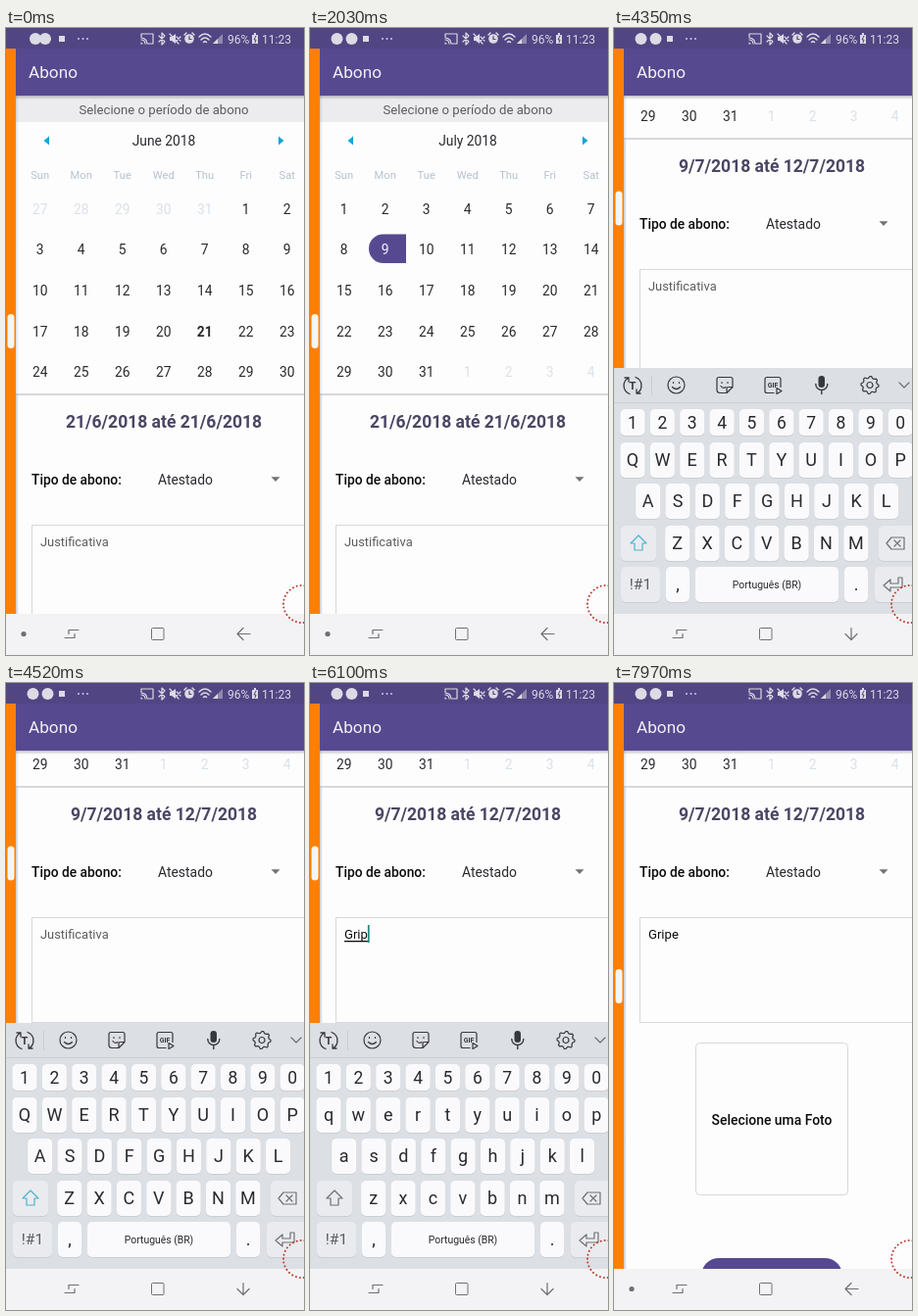
Recreate the animation shown at these times as an HTML page with a canvas. Size 304 by 640 pixels, loop 8000 ms.

```html
<!DOCTYPE html>
<html lang="pt-BR">
<head>
<meta charset="utf-8">
<title>Abono</title>
<style>
html, body { margin: 0; width: 100%; height: 100%; overflow: hidden; background: #fdfdfe; }
canvas { display: block; width: 304px; height: 640px; }
</style>
</head>
<body>
<canvas id="stage"></canvas>
<script>
const W = 304, H = 640, LOOP = 8000;
const canvas = document.getElementById('stage');
const ratio = window.devicePixelRatio || 1;
canvas.width = W * ratio;
canvas.height = H * ratio;
const ctx = canvas.getContext('2d');

const color = {
  page: '#fdfdfe', status: '#524583', header: '#574990', accent: '#574990', orange: '#fd8004',
  strip: '#ececef', nav: '#f3f3f5', board: '#dcdfe3', key: '#fafafc', softKey: '#e9ebee',
  line: '#d6d8dc', faint: '#d9e1e8', week: '#b6c1cd', ink: '#2a2a2e', grey: '#5c5c60', icon: '#707074'
};

// Moments of the interaction, in ms
const MONTH = 1080, FIRST_DAY = 1900, LAST_DAY = 2800, FOCUS = 3840;
const BOARD_IN = 3990, SCROLL = 4080, SUGGEST = 6550, BOARD_OUT = 7200;
const KEYS = [4780, 5160, 5620, 6010, 6400];
const WORD = 'Gripe', SHIFT_Y = 268, BOARD_TOP = 347, NAV_TOP = 598;

const clamp = v => Math.max(0, Math.min(1, v));
const ease = (t, start, length) => {
  const p = clamp((t - start) / length);
  return p * p * (3 - 2 * p);
};

function text(s, x, y, size, fill, align = 'center', weight = 400) {
  ctx.font = `${weight} ${size}px Roboto, sans-serif`;
  ctx.textAlign = align;
  ctx.fillStyle = fill;
  ctx.fillText(s, x, y);
}

function rect(x, y, w, h, fill) {
  ctx.fillStyle = fill;
  ctx.fillRect(x, y, w, h);
}

function round(x, y, w, h, r, fill, stroke) {
  ctx.beginPath();
  ctx.roundRect(x, y, w, h, r);
  if (fill) { ctx.fillStyle = fill; ctx.fill(); }
  if (stroke) { ctx.strokeStyle = stroke; ctx.lineWidth = 1; ctx.stroke(); }
}

function disc(x, y, r, fill) {
  ctx.beginPath();
  ctx.arc(x, y, r, 0, 7);
  ctx.fillStyle = fill;
  ctx.fill();
}

// Path given around its own centre
function icon(d, x, y, tint, filled = false, width = 1.2) {
  const path = new Path2D(d);
  ctx.save();
  ctx.translate(x, y);
  ctx.lineWidth = width;
  ctx.lineJoin = ctx.lineCap = 'round';
  ctx.strokeStyle = ctx.fillStyle = tint;
  filled ? ctx.fill(path) : ctx.stroke(path);
  ctx.restore();
}

function fade(x, y, w, h, alpha, vertical) {
  const g = vertical ? ctx.createLinearGradient(0, y, 0, y + h) : ctx.createLinearGradient(x, 0, x + w, 0);
  g.addColorStop(0, `rgba(50,50,60,${alpha})`);
  g.addColorStop(1, 'rgba(50,50,60,0)');
  rect(x, y, w, h, g);
}

function drawStatus(t) {
  const tint = '#dcdae4';
  rect(0, 0, W, 21, color.status);
  const spread = 5 + 2.5 * ease(t, 30, 300);
  disc(35 - spread, 11, 6, tint);
  disc(35 + spread, 11, 6, tint);
  rect(54, 8, 6, 6, tint);
  for (let i = 0; i < 3; i++) disc(74 + i * 4.5, 11, 0.9, tint);

  icon('M-6-2V-5H6V5H1M-6 1A4 4 0 0 1-2 5M-6-1A6 6 0 0 1 0 5M-6 4V5H-5', 144, 11, tint);
  icon('M-3-3L3 3L0 6V-6L3-3L-3 3', 159, 11, tint);
  icon('M-5-2H-3L1-5V5L-3 2H-5Z', 172, 11, tint, true);
  icon('M2-2L6 2M6-2L2 2M-5-5L4 5', 172, 11, tint);
  disc(187, 11, 4.8, tint);
  icon('M-5-4L-3-6M5-4L3-6', 187, 11, tint, false, 1.5);
  icon('M0-2.5V.5H2', 187, 11, color.status);
  icon('M-6-2Q0-8 6-2M-4 1Q0-3 4 1M-1.5 3.5Q0 2 1.5 3.5', 203, 11, tint, false, 1.5);
  icon('M-5 5H5V-5Z', 216, 11, '#9189ae', true);
  icon('M-5 5H0V0Z', 216, 11, tint, true);
  text('96%', 226, 15.5, 12, tint, 'left');
  icon('M-3-4H-1V-6H1V-4H3V5H-3Z', 254, 11, tint, true);
  icon('M1-3L-1 1H1L0 4', 254, 11, color.status, false, 1);
  text('11:23', 261, 15.5, 12, tint, 'left');
}

function drawHeader() {
  rect(0, 21, W, 48, color.header);
  text('Abono', 23, 51, 17.2, '#f1eff6', 'left');
  fade(10, 69, W - 10, 4, 0.3, true);
}

function drawCalendar(t) {
  const july = t >= MONTH;
  const colX = i => 34.7 + i * 42;
  rect(10, 69, W, 27, color.strip);
  text('Selecione o período de abono', 161, 87.5, 13.15, color.grey);
  icon('M3-4.5V4.5L-2.5 0Z', 41, 115, '#12a4e0', true);
  icon('M-3-4.5V4.5L2.5 0Z', 281, 115, '#12a4e0', true);
  text(july ? 'July 2018' : 'June 2018', 161, 120, 13.8, color.ink);
  ['Sun', 'Mon', 'Tue', 'Wed', 'Thu', 'Fri', 'Sat'].forEach((d, i) => text(d, colX(i), 153.5, 11.2, color.week));

  const from = t >= FIRST_DAY ? 9 : 99;
  const to = t >= LAST_DAY ? 12 : from;
  if (from === 9) {
    const whole = to === 12;
    round(60, 210.5, whole ? 159 : 38, 29.5, whole ? 15 : [15, 0, 0, 15], color.accent);
  }

  const lead = july ? 0 : 5, length = july ? 31 : 30;
  for (let cell = 0; cell < 35; cell++) {
    const day = cell - lead + 1;
    const outside = day < 1 || day > length;
    const label = day < 1 ? day + 31 : day > length ? day - length : day;
    const picked = !outside && day >= from && day <= to;
    const today = !july && day === 21;
    const tint = outside ? color.faint : picked ? '#f5f3f9' : color.ink;
    text(label, colX(cell % 7), 189.7 + Math.floor(cell / 7) * 41.6, 13.8, tint, 'center', today ? 700 : 400);
  }
}

function drawForm(t) {
  rect(10, 373, W, 2, color.line);
  rect(10, 375, 2, 500, '#ededf0');
  text(t >= LAST_DAY ? '9/7/2018 até 12/7/2018' : '21/6/2018 até 21/6/2018', 161, 408, 17.5, '#4b4663', 'center', 700);
  text('Tipo de abono:', 26, 465.5, 13.8, '#0c0c0c', 'left', 500);
  text('Atestado', 155, 465.5, 13.9, color.ink, 'left');
  icon('M-4.5-2.2H4.5L0 2.4Z', 275, 460.5, '#737377', true);

  ctx.strokeStyle = color.line;
  ctx.lineWidth = 1;
  ctx.strokeRect(26.5, 507.5, 320, 107);
  drawInput(t);

  round(83.5, 635.5, 155, 155, 4, null, color.line);
  text('Selecione uma Foto', 161, 719, 13.9, '#0c0c0c', 'center', 500);
  round(89, 855, 144, 36, 18, color.accent);
}

function drawInput(t) {
  const count = KEYS.filter(k => t >= k).length;
  const typed = WORD.slice(0, count);
  if (typed) text(typed, 35, 529, 13.1, '#0c0c0c', 'left');
  else text('Justificativa', 35, 529, 12.9, color.grey, 'left');
  if (t < FOCUS || t >= BOARD_OUT) return;
  ctx.font = '400 13.1px Roboto, sans-serif';
  const width = ctx.measureText(typed).width;
  if (typed) rect(35, 531, width, 1.3, '#0c0c0c');
  const since = t - (count ? KEYS[count - 1] : FOCUS);
  if (since % 1000 < 500) rect(35 + width, 515, 1.8, 18, '#238a80');
}

function drawEdge(bottom) {
  rect(0, 21, 10, bottom - 21, color.orange);
  fade(10, 69, 3, bottom - 69, 0.16, false);
  round(1.5, (21 + bottom) / 2 - 17.5, 7, 35, 3.5, '#f8f5f0');
}

function drawNav(boardOpen) {
  rect(0, NAV_TOP, W, H - NAV_TOP, color.nav);
  if (!boardOpen) disc(18, 618.5, 2.6, color.icon);
  icon('M-7 4H3V0M7-4H-3V0', 67, 618.5, color.icon);
  round(148.5, 612.5, 12.5, 12, 1, null, color.icon);
  icon(boardOpen ? 'M0-6V6M-6 0L0 6L6 0' : 'M7 0H-6M0-6L-6 0L0 6', 242, 618.5, color.icon);
}

function drawToolbar(suggesting) {
  const tint = '#38383c';
  icon('M-3 8.5A9 9 0 0 1-4-8M-8-8H-4V-4M3-8.5A9 9 0 0 1 4 8M8 8H4V4', 19, 365, tint, false, 1.3);
  icon('M-5-2.5L0 2.5L5-2.5', 296, 364.5, color.icon);
  if (suggesting) {
    icon('M-3-2V-1M3-2V-1M-3.5 2Q0 5 3.5 2', 19, 365, tint, false, 1.3);
    ['Gripe', 'Gripes', 'Tripé'].forEach((word, i) => text(word, 80 + i * 83.3, 370, 14.8, '#38383c'));
    return;
  }
  text('T', 19, 369, 11, tint, 'center', 700);
  rect(38, 355, 1, 20, '#c9ccd1');
  const ring = 'M8.5 0A8.5 8.5 0 1 1-8.5 0A8.5 8.5 0 1 1 8.5 0';
  icon(ring + 'M-3-3V-2M3-3V-2M-4 2Q0 6 4 2', 63.5, 364.5, tint);
  icon('M-6-8H6Q8-8 8-6V2L2 8H-5Q-8 8-8 5V-6Q-8-8-6-8M8 2H4Q2 2 2 4V8M-3-3V-2M3-3V-2M-4 1Q-2 4 1 2', 113, 364.5, tint);
  icon('M1 8H-6Q-8 8-8 6V-6Q-8-8-6-8H6Q8-8 8-6V2M4 3V9L9 6Z', 162, 364.5, tint);
  text('GIF', 162, 366.5, 7, tint, 'center', 700);
  round(208.5, 355, 6.5, 12, 3.2, tint);
  icon('M-6-1A6 6 0 0 0 6-1M0 5V9', 211.8, 364.5, tint, false, 1.4);
  let gear = '';
  for (let i = 0; i < 32; i++) {
    const a = i * Math.PI / 16, r = i % 4 < 2 ? 9 : 7.3;
    gear += `${i ? 'L' : 'M'}${(r * Math.cos(a)).toFixed(2)} ${(r * Math.sin(a)).toFixed(2)}`;
  }
  icon(gear + 'ZM3 0A3 3 0 1 1-3 0A3 3 0 1 1 3 0', 261, 364.5, tint);
}

function key(x, y, w, h, label, size = 18, soft = false) {
  round(x, y + 1, w, h, 5, '#cbced3');
  round(x, y, w, h, 5, soft ? color.softKey : color.key);
  if (label) text(label, x + w / 2, y + h / 2 + size * 0.35, size, soft ? color.grey : color.ink);
}

function drawBoard(t, offset) {
  const upper = t < KEYS[0];
  ctx.save();
  ctx.beginPath();
  ctx.rect(0, 0, W, NAV_TOP);
  ctx.clip();
  ctx.translate(0, offset);
  rect(0, BOARD_TOP, W, NAV_TOP - BOARD_TOP, color.board);
  rect(0, BOARD_TOP + 35, W, 1, '#cbced3');
  drawToolbar(t >= SUGGEST);

  const rows = [['1234567890', 19, 389, 27], ['qwertyuiop', 19, 423, 36], ['asdfghjkl', 34.7, 465, 36], ['zxcvbnm', 64.7, 508, 36]];
  for (const [letters, first, y, h] of rows) {
    [...letters].forEach((c, i) => key(first - 12.5 + i * 30.36, y, 25, h, upper ? c.toUpperCase() : c, h < 30 ? 17.5 : 18));
  }
  key(7, 508, 36, 36, '', 18, true);
  icon('M0-8L8 0H4V7H-4V0H-8Z', 25, 526, upper ? '#4fb4cf' : color.icon);
  key(270, 508, 42, 36, '', 18, true);
  icon('M-9 0L-4-6H9V6H-4ZM-1-3L5 3M5-3L-1 3', 287, 526, color.icon);
  key(7, 550, 40, 36, '!#1', 15.5, true);
  key(53, 550, 24, 36, ',');
  key(83, 550, 146, 36, 'Português (BR)', 10.4);
  key(235, 550, 24, 36, '.');
  key(266, 550, 46, 36, '', 18, true);
  icon('M9-7V3H-3V7L-10 1L-3-5V-1H5V-7Z', 285, 568, color.icon);
  ctx.restore();
}

function drawTouchRing() {
  ctx.save();
  ctx.beginPath();
  ctx.arc(302, 588, 19, 0, Math.PI * 2);
  ctx.setLineDash([0.01, 3.97]);
  ctx.lineCap = 'round';
  ctx.lineWidth = 2;
  ctx.strokeStyle = '#bb3f30';
  ctx.stroke();
  ctx.restore();
}

function draw(t) {
  const shown = ease(t, BOARD_IN, 260) - ease(t, BOARD_OUT, 260);
  const boardOpen = t >= BOARD_IN + 130 && t < BOARD_OUT + 60;
  ctx.setTransform(ratio, 0, 0, ratio, 0, 0);
  rect(0, 0, W, H, color.page);

  ctx.save();
  ctx.beginPath();
  ctx.rect(0, 69, W, NAV_TOP - 69);
  ctx.clip();
  ctx.translate(0, -SHIFT_Y * ease(t, SCROLL, 300));
  drawCalendar(t);
  drawForm(t);
  ctx.restore();

  drawStatus(t);
  drawHeader();
  drawEdge(boardOpen ? BOARD_TOP : NAV_TOP);
  if (shown > 0) drawBoard(t, (1 - shown) * (NAV_TOP - BOARD_TOP));
  drawNav(boardOpen);
  drawTouchRing();
}

const start = performance.now();
function tick() {
  draw((performance.now() - start) % LOOP);
  requestAnimationFrame(tick);
}
tick();
</script>
</body>
</html>
```
